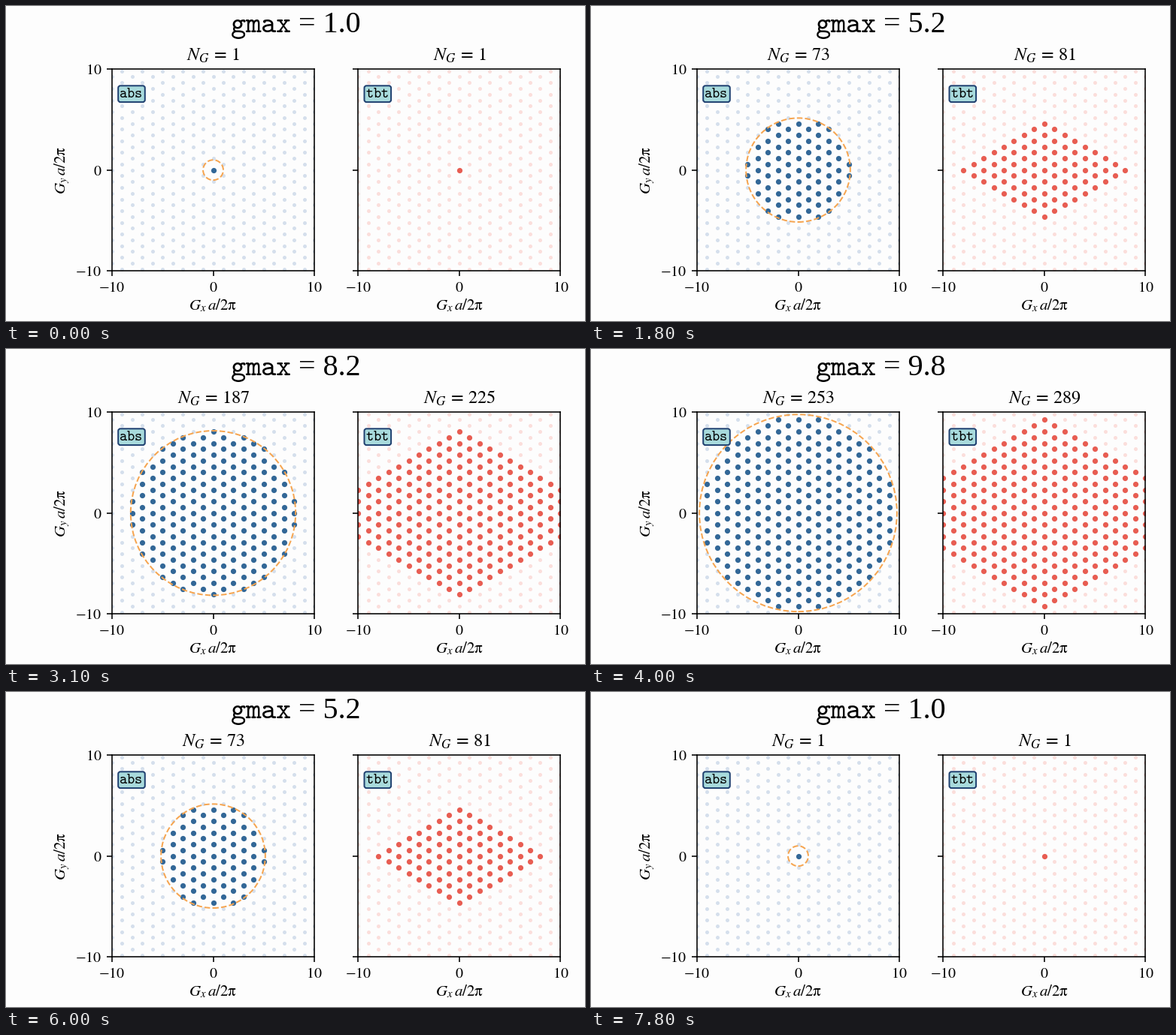
Write a matplotlib script that moves like this. It is 770x420 px and loops after 7.9 s.

```python
import numpy as np
import matplotlib.pyplot as plt
from matplotlib.animation import FuncAnimation
from matplotlib.patches import Circle, FancyBboxPatch
from matplotlib.transforms import Affine2D

W, H, DPI = 770, 420, 140
PT = 72 / DPI                      # points per pixel
SIDE, TOP = 269, 84.2
LEFTS = (141, 468.3)
BLUE, RED, ORANGE = "#326797", "#e85d52", "#f6a550"
PALE_BLUE, PALE_RED = "#d5dfec", "#fbdedb"
BACK, TEAL, NAVY = "#fdfdfd", "#a8dadc", "#1f4070"
STEPS, G_MAX = 40, 10

plt.rcParams.update({
    "mathtext.fontset": "stix",
    "font.family": "Liberation Serif",
    "axes.linewidth": 1.6 * PT,
})
fig = plt.figure(figsize=(W / DPI, H / DPI), dpi=DPI, facecolor=BACK)
pixels = Affine2D().scale(1 / W, -1 / H).translate(0, 1) + fig.transFigure

# Hexagonal reciprocal lattice, G = i*b1 + j*b2
B_LEN = 2 / np.sqrt(3)
i, j = (m.ravel() for m in np.mgrid[-20:21, -20:21])
gx, gy = i + j, (i - j) * B_LEN / 2
inside = (abs(gx) <= G_MAX + 1) & (abs(gy) <= G_MAX + 1)
circular = np.hypot(gx, gy)
parallel = np.maximum(abs(i), abs(j)) * B_LEN


def put(x, y, s, size, ha="center", **kw):
    return fig.text(x, y, s, fontsize=size * PT, ha=ha, va="baseline",
                    transform=pixels, zorder=6, **kw)


def panel(left, name, name_x, color, pale, labels):
    ax = fig.add_axes([left / W, 1 - (TOP + SIDE) / H, SIDE / W, SIDE / H],
                      facecolor=BACK)
    ax.set(xlim=(-G_MAX, G_MAX), ylim=(-G_MAX, G_MAX))
    ticks = [-10, 0, 10]
    names = [f"${t}$" for t in ticks]
    ax.set_xticks(ticks, names)
    ax.set_yticks(ticks, names if labels else [""] * 3)
    ax.tick_params(length=7 * PT, width=1.6 * PT, pad=7 * PT,
                   labelsize=20 * PT)

    def dots(c, size):
        return ax.plot(gx[inside], gy[inside], "o", color=c, ms=size * PT,
                       mew=0, zorder=1)[0]

    dots(pale, 5)
    chosen = dots(color, 7.2)

    mid = left + SIDE / 2
    put(mid, 405.5, r"$G_x\,a/2\mathrm{\pi}$", 21)
    fig.add_artist(FancyBboxPatch(
        (left + 8.2, 106.3), 35.6, 21.8,
        boxstyle="round,pad=0,rounding_size=3", fc=TEAL, ec=NAVY,
        lw=2 * PT, transform=pixels, zorder=5))
    put(name_x, 122, rf"$\mathtt{{{name}}}$", 19.4, "left",
        math_fontfamily="cm")
    return ax, chosen, put(mid + 0.3, 73, "", 24.3)


ax, abs_dots, abs_count = panel(LEFTS[0], "abs", 149.5, BLUE, PALE_BLUE, True)
_, tbt_dots, tbt_count = panel(LEFTS[1], "tbt", 478, RED, PALE_RED, False)
put(79.5, 218.5, r"$G_y\,a/2\mathrm{\pi}$", 21, rotation=90,
    rotation_mode="anchor")

ring = ax.add_patch(Circle((0, 0), 1, fill=False, ec=ORANGE, lw=2 * PT,
                           ls="--", zorder=2))
word = put(380, 35, r"$\mathtt{gmax}$", 38.6, "right", math_fontfamily="cm")
value = put(388.8, 35, "", 40, "left")


def select(points, count, norm, g):
    keep = norm <= g + 1e-9
    points.set_data(gx[keep], gy[keep])
    count.set_text(rf"$N_G\,=\,{keep.sum()}$")


def draw(k):
    step = min(k, 2 * (STEPS - 1) - k)
    g = 1 + (G_MAX - 1) * step / (STEPS - 1)
    select(abs_dots, abs_count, circular, g)
    select(tbt_dots, tbt_count, parallel, g)
    ring.set_radius(g)
    # the title stays centred when the value gains a digit
    shift = 10 if g > 9.95 else 0
    word.set_x(380 - shift)
    value.set_x(388.8 - shift)
    value.set_text(f"= {g:.1f}")
    return abs_dots, tbt_dots, abs_count, tbt_count, ring, word, value


anim = FuncAnimation(fig, draw, frames=2 * STEPS - 1, interval=100,
                     repeat=True, repeat_delay=0, blit=False)
plt.show()
```
